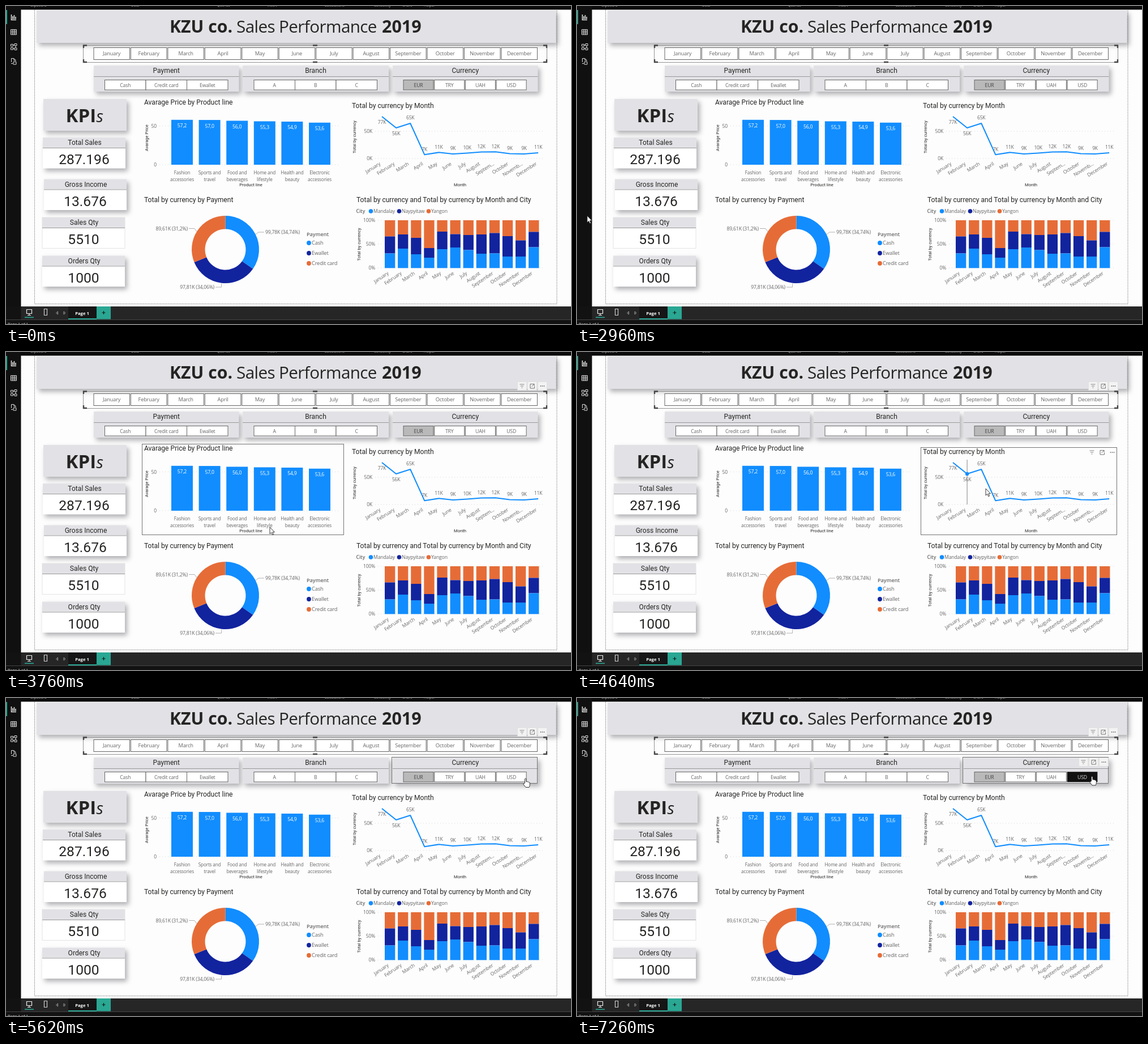
Animation of 998x561 px, one loop 8 s. Source, as an HTML page:

```html
<!DOCTYPE html>
<html lang="en">
<head>
<meta charset="utf-8">
<title>Sales dashboard</title>
<style>
html, body { margin: 0; width: 100%; height: 100%; overflow: hidden; background: #fdfdfd; }
svg { display: block; width: 100vw; height: 100vh; }
.ui { font-family: "Open Sans", "Noto Sans", sans-serif; letter-spacing: -.02em; }
.b { font-family: "Open Sans", "Noto Sans", sans-serif; font-weight: 700; }
.din { font-family: Roboto, Arial, sans-serif; }
.lift { filter: drop-shadow(4px 5px 4px rgba(30, 30, 40, .34)); }
</style>
</head>
<body>
<svg id="stage" viewBox="0 0 998 561"></svg>
<script>
const INK = '#252423', GREY = '#666', PAPER = '#fdfdfd', PANEL = '#e2e2e6', TEAL = '#2aa793';
const BLUE = '#118dff', NAVY = '#12239e', ORANGE = '#e66c37';
const MONTHS = ['January', 'February', 'March', 'April', 'May', 'June', 'July',
  'August', 'September', 'October', 'November', 'December'];
const stage = document.getElementById('stage');

const rect = (x, y, w, h, fill, more = '') =>
  `<rect x="${x}" y="${y}" width="${w}" height="${h}" fill="${fill}" ${more}/>`;
const path = (d, stroke, w = 1, more = '') =>
  `<path d="${d}" fill="none" stroke="${stroke}" stroke-width="${w}" ${more}/>`;
const dot = (x, y, r, fill) => `<circle cx="${x}" cy="${y}" r="${r}" fill="${fill}"/>`;
const text = (s, x, y, size, { c = 'ui', fill = GREY, a = 'middle', more = '' } = {}) =>
  `<text x="${x}" y="${y}" font-size="${size}" class="${c}" fill="${fill}" text-anchor="${a}" ${more}>${s}</text>`;
const turn = (deg, x, y) => `transform="rotate(${deg} ${x} ${y})"`;
const title = (s, x, y, a = 'start') => text(s, x, y, 12.08, { c: 'din', fill: INK, a });
const axisName = (s, x, y, deg = 0) =>
  text(s, x, y, 7.65, { c: 'din', fill: INK, more: deg ? turn(deg, x, y) : '' });
const grid = (x1, x2, y) => path(`M${x1} ${y}H${x2}`, '#d5d5d5', 1, 'stroke-dasharray="1 4"');
const slanted = (s, x, y, deg) => text(s, x, y, 8.7, { a: 'end', more: turn(deg, x, y) });

function appFrame() {
  let s = rect(0, 0, 998, 561, PAPER);
  s += path('M50.5 7V525.5H973V7', '#555', 1, 'stroke-dasharray="1 1.5"');
  s += rect(0, 0, 998, 6.5, '#0b0b0b') + rect(0, 0, 26.5, 561, '#101010');
  const groups = [['Clipboard', 57], ['Data', 228], ['Queries', 384], ['Insert', 470],
    ['Calculations', 580], ['Sensitivity', 665], ['Share', 709], ['Helper', 748]];
  for (const [name, x] of groups) s += text(name, x, 1, 6.6, { fill: '#bbb' });
  s += rect(0, 7, 2, 25, TEAL);
  s += path('M9.5 15V24.5H18M12 23V18M14.5 23V16M17 23V19', '#ddd', 1.6);
  s += path('M8.5 41.5H18.5V50.5H8.5ZM8.5 44.5H18.5M8.5 47.5H18.5M12 42V50M15.3 42V50', '#ddd');
  s += path('M8.5 67.5H12.5V71H8.5ZM8.5 73.5H12.5V77H8.5ZM15 66.5H19V70H15ZM15 74H19V77.5H15ZM12.5 69H15M12.5 75H15M17 70V74', '#ddd');
  s += path('M9.5 99V92.5H14L17 95.5V97M14 93V96H17M9 101.5H12M13 98.5H18V103H13Z', '#ddd');
  return s;
}

function bottomBar() {
  let s = rect(0, 530, 998, 31, '#121212') + rect(26.5, 530, 971.5, 23, '#262627') + rect(0, 553, 998, 1, '#444');
  s += path('M36.5 535.5H45.5V542.5H36.5ZM41 543V545M38 545.5H44', '#eee', 1.2);
  s += rect(33, 548.5, 16, 1.6, TEAL);
  s += path('M67.5 534.5H72.5V545.5H67.5Z', '#ccc', 1.2);
  s += path('M91.5 539L88.5 541.5L91.5 544ZM102 539L105 541.5L102 544Z', '#aaa', .9);
  s += rect(110, 530, 50, 23, '#161616') + rect(110, 551, 50, 2, TEAL);
  s += text('Page 1', 134.5, 545, 7.7, { c: 'b', fill: '#fff' });
  s += rect(160, 530, 25, 22.5, TEAL) + path('M169.5 541H175.5M172.5 538V544', '#111', 1.1);
  return s + text('Page 1 of 1', 3, 564, 7.4, { fill: '#ccc', a: 'start' });
}

function header() {
  let s = rect(54, 8, 917.5, 57, PANEL, 'class="lift"');
  s += text('KZU co.', 289, 47, 30.2, { c: 'b', fill: INK, a: 'start' });
  s += text('Sales Performance', 407, 47, 29.6, { fill: INK, a: 'start' });
  s += text('2019', 664, 47, 30.5, { c: 'b', fill: INK, a: 'start' });
  s += path('M136.5 69.5H955.5V99.5H136.5Z', '#888', .9);
  s += path('M143 69.5H137V74M949 69.5H955V74M143 99H137V94M949 99H955V94M542 69.5H550M542 99H550', '#444', 2.4);
  MONTHS.forEach((m, i) => {
    const x = 155 + 65.45 * i;
    s += rect(x, 73.5, 63.5, 21, '#fff', 'stroke="#666"') + text(m, x + 31.7, 87.4, 9.25);
  });
  return s;
}

function slicer(name, x, w, buttons, bx, bw, pitch) {
  let s = rect(x, 105, w, 46, PANEL, 'class="lift"') + title(name, x + w / 2, 118, 'middle');
  s += path(`M${x} 124.5H${x + w}`, '#999');
  buttons.forEach((b, i) => {
    const left = bx + pitch * i, on = b === 'EUR';
    s += rect(left, 130.5, bw, 17.5, on ? '#b9b9b9' : '#fff', 'stroke="#666"');
    s += text(b, left + bw / 2, 142.5, 8.7, { fill: on ? '#444' : GREY });
  });
  return s;
}

function card(name, value, x, y, flat) {
  const border = flat ? 'stroke="#e4e4e4"' : 'class="lift"';
  return rect(x, y, 146, 54.5, '#fff', border) + rect(x, y, 146, 18, PANEL) +
    path(`M${x} ${y + 18.5}H${x + 146}`, '#999') +
    title(name, x + 74, y + 13.3, 'middle') +
    text(value, x + 73, y + 47.3, 24.6, { c: 'din', fill: INK });
}

function kpis() {
  return rect(66, 164, 147, 56, PANEL, 'class="lift"') +
    text('KPI', 105.5, 205, 33, { c: 'b', fill: INK, a: 'start' }) +
    text('s', 159.5, 205, 29, { fill: INK, a: 'start', more: 'font-style="italic"' }) +
    card('Total Sales', '287.196', 65, 232) + card('Gross Income', '13.676', 67, 305.5) +
    card('Sales Qty', '5510', 64, 373, true) + card('Orders Qty', '1000', 64, 440.5);
}

function barChart() {
  const bars = [[57.2, 'Fashion', 'accessories'], [57, 'Sports and', 'travel'],
    [56, 'Food and', 'beverages'], [55.3, 'Home and', 'lifestyle'],
    [54.9, 'Health and', 'beauty'], [53.6, 'Electronic', 'accessories']];
  let s = title('Avarage Price by Product line', 244, 174) + grid(271, 591, 211.5) + grid(271, 591, 280);
  s += text('50', 266, 214.5, 8.5, { a: 'end' }) + text('0', 266, 283, 8.5, { a: 'end' });
  bars.forEach(([v, a, b], i) => {
    const x = 311 + 48.6 * i, h = v * 1.385;
    s += rect(x - 19, 280 - h, 38, h, BLUE);
    s += text(v.toFixed(1).replace('.', ','), x, 293.5 - h, 8.7, { fill: '#fff' });
    s += text(a, x, 297, 8.2) + text(b, x, 309, 8.2);
  });
  return s + axisName('Avarage Price', 250.5, 232.5, -90) + axisName('Product line', 432.5, 318);
}

const LINE_Y = [195, 215, 207, 262.3, 258.3, 261, 259.5, 257.6, 257.2, 260.5, 261, 259];
const lineX = i => 664 + 25.1 * i;

function lineChart() {
  const labels = [77, 56, 65, 7, 11, 9, 10, 12, 12, 9, 9, 11];
  let s = title('Total by currency by Month', 611, 180) + grid(652, 952, 221) + grid(652, 952, 269);
  s += text('50K', 647, 224, 8.5, { a: 'end' }) + text('0K', 647, 272, 8.5, { a: 'end' });
  s += path('M' + LINE_Y.map((y, i) => `${lineX(i)} ${y}`).join('L'), BLUE, 2, 'stroke-linejoin="round"');
  labels.forEach((v, i) => {
    const y = i < 2 ? LINE_Y[i] + 13 : LINE_Y[i] - 6.7;
    s += text(v + 'K', lineX(i), y, 8.5);
    const m = MONTHS[i];
    s += slanted(m === 'September' || m === 'November' ? m.slice(0, 6) + '...' : m, lineX(i) - 2, 280, -32);
  });
  return s + axisName('Total by currency', 617.5, 231, -90) + axisName('Month', 802, 318);
}

function donut() {
  const cx = 387.5, cy = 429.5;
  const at = (f, r) => {
    const a = f * 2 * Math.PI;
    return `${cx + r * Math.sin(a)} ${cy - r * Math.cos(a)}`;
  };
  const slice = (a, b, fill) =>
    `<path fill="${fill}" d="M${at(a, 59.5)}A59.5 59.5 0 0 1 ${at(b, 59.5)}L${at(b, 36)}A36 36 0 0 0 ${at(a, 36)}Z"/>`;
  let s = title('Total by currency by Payment', 244, 346);
  s += slice(0, .3474, BLUE) + slice(.3474, .688, NAVY) + slice(.688, 1, ORANGE);
  s += path('M441 403L446 399H456M337 398L333 392.5H323M380.5 490V496H370', '#aaa', .9);
  s += text('99,78K (34,74%)', 458, 402, 8.65, { a: 'start' });
  s += text('89,61K (31,2%)', 321, 395.5, 8.7, { a: 'end' });
  s += text('97,81K (34,06%)', 368, 499, 8.65, { a: 'end' });
  s += text('Payment', 531, 405.5, 9.1, { c: 'b', a: 'start', more: 'style="font-weight:600"' });
  [['Cash', BLUE], ['Ewallet', NAVY], ['Credit card', ORANGE]].forEach(([name, fill], i) => {
    s += dot(535, 418 + 18 * i, 3.9, fill) + text(name, 540, 421.2 + 18 * i, 9.3, { a: 'start' });
  });
  return s;
}

function stackChart() {
  const tops = [[436.5, 406.5], [428, 403], [438, 409], [444, 427], [429, 398], [426, 402.5],
    [430.5, 404], [437, 403], [436.5, 400.5], [442, 406], [442, 413.5], [425.5, 398.5]];
  let s = title('Total by currency and Total by currency by Month and City', 619, 346);
  s += text('City', 618.5, 365, 8.6, { c: 'b', a: 'start', more: 'style="font-weight:600"' });
  [['Mandalay', BLUE, 644.5], ['Naypyitaw', NAVY, 694.5], ['Yangon', ORANGE, 746.5]].forEach(([name, fill, x]) => {
    s += dot(x, 362, 3.8, fill) + text(name, x + 4.6, 365, 8.65, { a: 'start' });
  });
  [100, 50, 0].forEach((v, i) => {
    const y = 378 + 42 * i;
    s += grid(657, 950, y) + text(v + '%', 652, y + 3, 8.5, { a: 'end' });
  });
  tops.forEach(([blue, navy], i) => {
    const x = 669 + 23.1 * i;
    s += rect(x, 378, 18.3, navy - 378, ORANGE) + rect(x, navy, 18.3, blue - navy, NAVY) +
      rect(x, blue, 18.3, 462.3 - blue, BLUE) + slanted(MONTHS[i], x + 7.5, 473, -34);
  });
  return s + axisName('Total by currency', 625.5, 420.5, -90);
}

// Filter, focus and "more" icons of a visual, the last one centred on x
function tools(x, y, boxed) {
  let s = '';
  if (boxed) for (let i = 0; i < 3; i++) s += rect(x - 44 + 18 * i, y - 7.5, 16, 15, '#f3f3f3', 'stroke="#ddd" stroke-width=".7"');
  s += path(`M${x - 40} ${y - 3}h8m-6.7 3h5.4m-3.7 3h2`, '#777', .9);
  s += path(`M${x - 18} ${y - 3.5}h-3.5v7.5h7.5v-3.5m-5 .5l4.5-4.5m-3.5 0h3.5v3.5`, '#666', .9);
  return s + [-3, 0, 3].map(d => dot(x + d, y, .85, '#444')).join('');
}

// Cursor stops: time, x, y
const STOPS = [[3060, 18, 370], [3760, 466, 309], [4500, 698, 247], [4590, 698, 247], [4640, 722, 241],
  [5340, 905, 159], [5440, 905, 159], [5620, 918, 144], [5900, 922, 144], [6130, 922, 144],
  [6440, 912, 143], [7160, 912, 143], [7260, 910, 140.5]];
const TOOLS_DELAY = 280, MARKER_DELAY = 60;

function cursorAt(t) {
  const n = STOPS.findIndex(k => k[0] > t);
  if (n < 1) return (n ? STOPS[STOPS.length - 1] : STOPS[0]).slice(1);
  const [t0, x0, y0] = STOPS[n - 1], [t1, x1, y1] = STOPS[n];
  const p = (t - t0) / (t1 - t0), e = p * p * (3 - 2 * p);
  return [x0 + (x1 - x0) * e, y0 + (y1 - y0) * e];
}

// Hover areas: left, top, right, bottom, icon row, icons boxed
const VISUALS = [[240.5, 162.5, 596.5, 322.5, 171], [240.5, 335.5, 596.5, 512.5, 344],
  [607.5, 168.5, 953.5, 322.5, 177], [681.5, 104.5, 938.5, 150.5, 113, true]];
const LINE = VISUALS[2], CURRENCY = VISUALS[3];
const visualAt = ([x, y]) => VISUALS.find(([l, t, r, b]) => x > l && x < r && y > t && y < b);

function pointer(x, y, hand) {
  const d = hand
    ? 'M-1.5 6V-1.4Q-.3-2.8 .9-1.4V3.6Q2.2 2.8 3.3 4Q4.8 3.4 5.6 4.7Q7.2 4.6 7.3 6V9.2Q7.2 11.8 6 13.5H0L-4 8.5Q-4.5 6.8-2.8 7Z'
    : 'M0 0V12L2.8 9.5L4.7 13.8L6.6 13L4.8 8.8H8.4Z';
  return `<path transform="translate(${x} ${y})" d="${d}" fill="#fff" stroke="#222" stroke-width=".9" stroke-linejoin="round"/>`;
}

function overlay(t) {
  if (t < 2960) return '';
  const at = cursorAt(t), hit = visualAt(at);
  let s = at[0] > 50 ? tools(947.5, 60, true) : '';
  if (hit) {
    const [l, top, r, b, row, boxed] = hit;
    s += rect(l, top, r - l, b - top, 'none', 'stroke="#666" stroke-width=".9"');
    if (visualAt(cursorAt(t - TOOLS_DELAY)) === hit) s += tools(r - 8, row, boxed);
  }
  const late = cursorAt(t - MARKER_DELAY);
  if (hit === LINE && visualAt(late) === LINE && late[0] > 650) {
    const i = Math.max(0, Math.min(11, Math.round((late[0] - 664) / 25.1)));
    s += path(`M${lineX(i)} 190V269`, '#777', .9) + dot(lineX(i), LINE_Y[i], 3.2, BLUE);
  }
  if (t >= 6140) s += rect(866, 130.5, 53, 17.5, '#111') + text('USD', 892.5, 142.5, 8.7, { fill: '#ddd' });
  return s + pointer(at[0], at[1], hit === CURRENCY);
}

stage.innerHTML = appFrame() + header() +
  slicer('Payment', 155, 256.5, ['Cash', 'Credit card', 'Ewallet'], 174.5, 72.5, 72.5) +
  slicer('Branch', 418, 258, ['A', 'B', 'C'], 438, 72.5, 72.5) +
  slicer('Currency', 683, 256.5, ['EUR', 'TRY', 'UAH', 'USD'], 702, 53, 54.7) +
  kpis() + barChart() + lineChart() + donut() + stackChart() + bottomBar() + '<g id="live"></g>';
const live = document.getElementById('live');

const start = performance.now();
function draw() {
  live.innerHTML = overlay((performance.now() - start) % 8000);
  requestAnimationFrame(draw);
}
draw();
</script>
</body>
</html>
```
